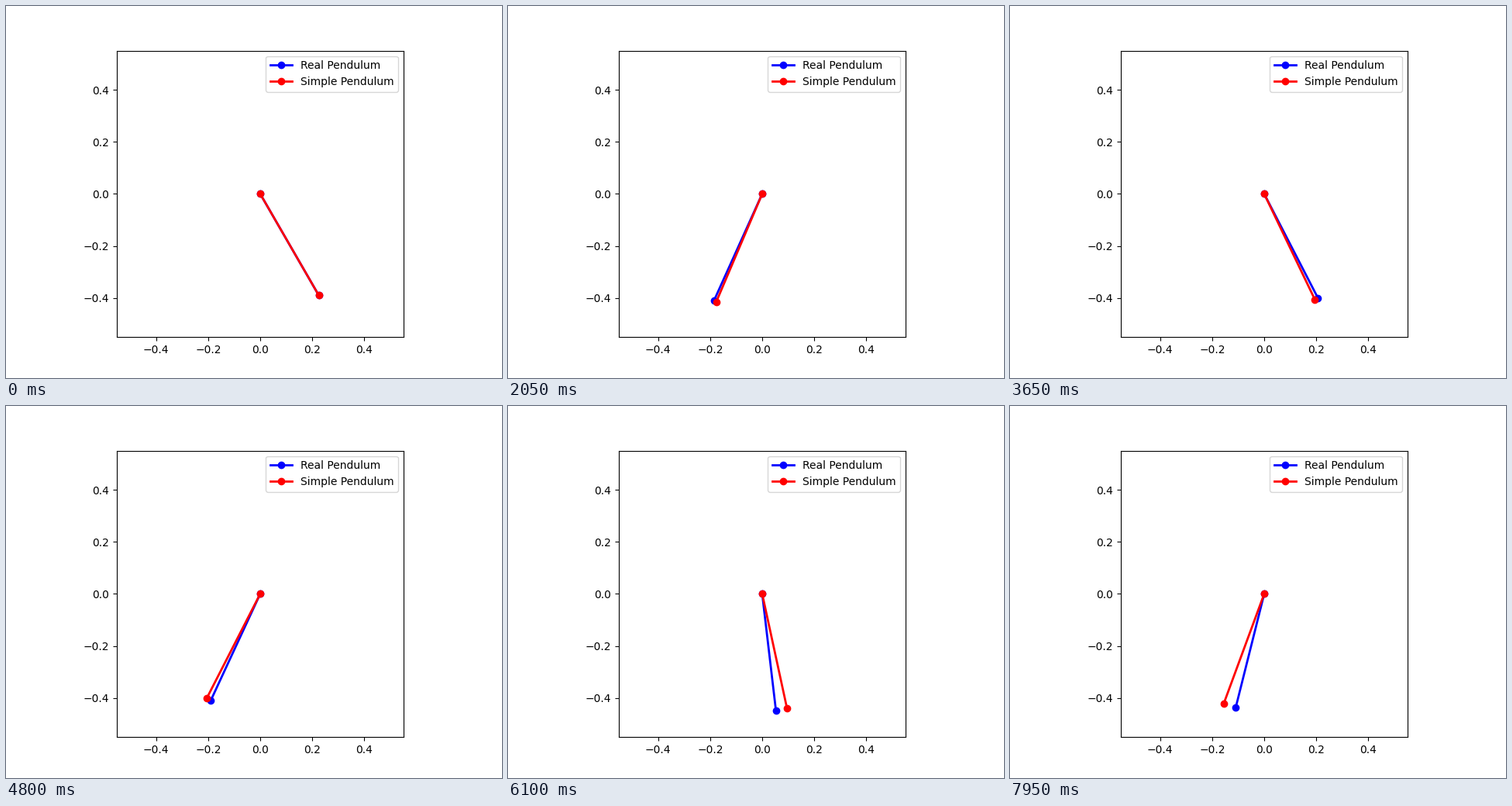
Animation, 640 px wide and 480 px high, one loop 8000 ms. Source, as a matplotlib script:

```python
import numpy as np
import matplotlib.pyplot as plt
from matplotlib.animation import FuncAnimation

G = 9.81
LENGTH = 0.45
START = np.pi / 6
FRAMES = 160
INTERVAL = 50
DT = 10 / 499        # simulated seconds per frame
SUBSTEPS = 10


def slope(state):
    theta, omega = state
    return np.array([omega, -G / LENGTH * np.sin(theta)])


def rk4(state, h):
    k1 = slope(state)
    k2 = slope(state + h / 2 * k1)
    k3 = slope(state + h / 2 * k2)
    k4 = slope(state + h * k3)
    return state + h / 6 * (k1 + 2 * k2 + 2 * k3 + k4)


def real_angles():
    state = np.array([START, 0.0])
    angles = []
    for _ in range(FRAMES):
        angles.append(state[0])
        for _ in range(SUBSTEPS):
            state = rk4(state, DT / SUBSTEPS)
    return np.array(angles)


real = real_angles()
simple = START * np.cos(np.sqrt(G / LENGTH) * DT * np.arange(FRAMES))

fig, ax = plt.subplots(figsize=(6.4, 4.8), dpi=100)
limit = LENGTH + 0.1
ax.set_xlim(-limit, limit)
ax.set_ylim(-limit, limit)
ax.set_aspect("equal")

real_rod, = ax.plot([], [], "o-", color="blue", lw=2, label="Real Pendulum")
simple_rod, = ax.plot([], [], "o-", color="red", lw=2, label="Simple Pendulum")
ax.legend(loc="upper right")


def place(rod, theta):
    rod.set_data([0, LENGTH * np.sin(theta)], [0, -LENGTH * np.cos(theta)])


def update(i):
    place(real_rod, real[i])
    place(simple_rod, simple[i])
    return real_rod, simple_rod


anim = FuncAnimation(fig, update, frames=FRAMES, interval=INTERVAL,
                     repeat=True, repeat_delay=0, blit=False)
plt.show()
```
